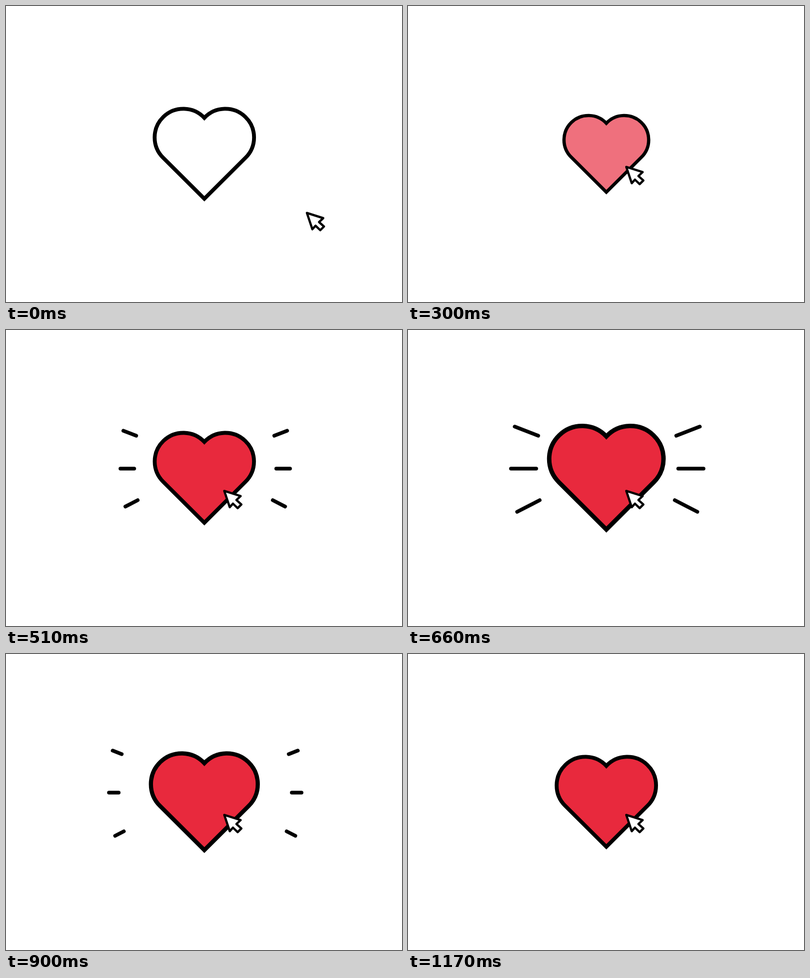
An HTML page that plays this animation: 800x600 px, repeating every 1290 ms.

```html
<!DOCTYPE html>
<html lang="en">
<head>
<meta charset="utf-8">
<title>Like click</title>
<style>
  html, body { margin: 0; width: 100%; height: 100%; overflow: hidden; background: #fff; }
  svg { display: block; width: 100%; height: 100%; }
</style>
</head>
<body>
<svg viewBox="0 0 800 600" stroke="#000">
  <path id="heart" fill="#e8293d" stroke-width="7.8" stroke-miterlimit="10"
    d="M0 90.3 L-83.3 7 A58 58 0 1 1 0 -73.7 A58 58 0 1 1 83.3 7 Z"/>
  <g id="rays" stroke-width="7.5" stroke-linecap="round"></g>
  <path id="cursor" fill="#fff" stroke-width="4.5" stroke-linejoin="round"
    d="M0 0 L33 10.5 L24.5 18.5 L34.5 27.5 L27 35 L17.5 25.8 L11 33 Z"/>
</svg>
<script>
const LOOP = 1290, STEP = 30;
const CLICK = 240, PRESSED = 330, PEAK = 660, RAYS_END = 1050;
const [heart, rays, cursor] = ['heart', 'rays', 'cursor'].map(id => document.getElementById(id));

const progress = (t, from, to) => Math.min(1, Math.max(0, (t - from) / (to - from)));
const mix = (a, b, p) => a + (b - a) * p;
const smooth = p => p * p * (3 - 2 * p);
const smoother = p => p * p * p * (10 + p * (6 * p - 15));
const bezier = (a, b, c, p) => mix(mix(a, b, p), mix(b, c, p), p);

// Inner x, y and outer x, y of the left rays; the right ones mirror them.
const left = [
  [263, 214.3, 215.5, 195.8],
  [259, 281, 208, 281],
  [266, 345, 220.5, 368.5]
];
const right = left.map(([x1, y1, x2, y2]) => [805 - x1, y1, 805 - x2, y2]);
const lines = [...left, ...right].map(ends => ({
  ends,
  el: rays.appendChild(document.createElementNS('http://www.w3.org/2000/svg', 'line'))
}));

function heartScale(t) {
  if (t < PRESSED) return mix(1, 0.8, smooth(progress(t, CLICK, PRESSED)));
  if (t < PEAK) return mix(0.8, 1.15, smooth(progress(t, PRESSED, PEAK)));
  return mix(1.15, 1, smoother(progress(t, 690, 1110)));
}

function draw(t) {
  heart.setAttribute('transform', `translate(400.7 300.5) scale(${heartScale(t)})`);
  heart.setAttribute('fill-opacity', progress(t, CLICK, PRESSED));

  const move = smooth(progress(t, 0, CLICK));
  const x = bezier(607.9, 476, 441, move), y = bezier(419.5, 415, 326.2, move);
  cursor.setAttribute('transform', `translate(${x} ${y})`);

  const head = progress(t, PRESSED, PEAK), tail = progress(t, PEAK, RAYS_END);
  rays.setAttribute('visibility', head > tail ? 'visible' : 'hidden');
  for (const { ends: [x1, y1, x2, y2], el } of lines) {
    el.setAttribute('x1', mix(x1, x2, tail));
    el.setAttribute('y1', mix(y1, y2, tail));
    el.setAttribute('x2', mix(x1, x2, head));
    el.setAttribute('y2', mix(y1, y2, head));
  }
}

let start;
function tick(now) {
  start ??= now;
  const t = (now - start) % LOOP;
  draw(Math.floor(t / STEP) * STEP);
  requestAnimationFrame(tick);
}
draw(0);
requestAnimationFrame(tick);
</script>
</body>
</html>
```
